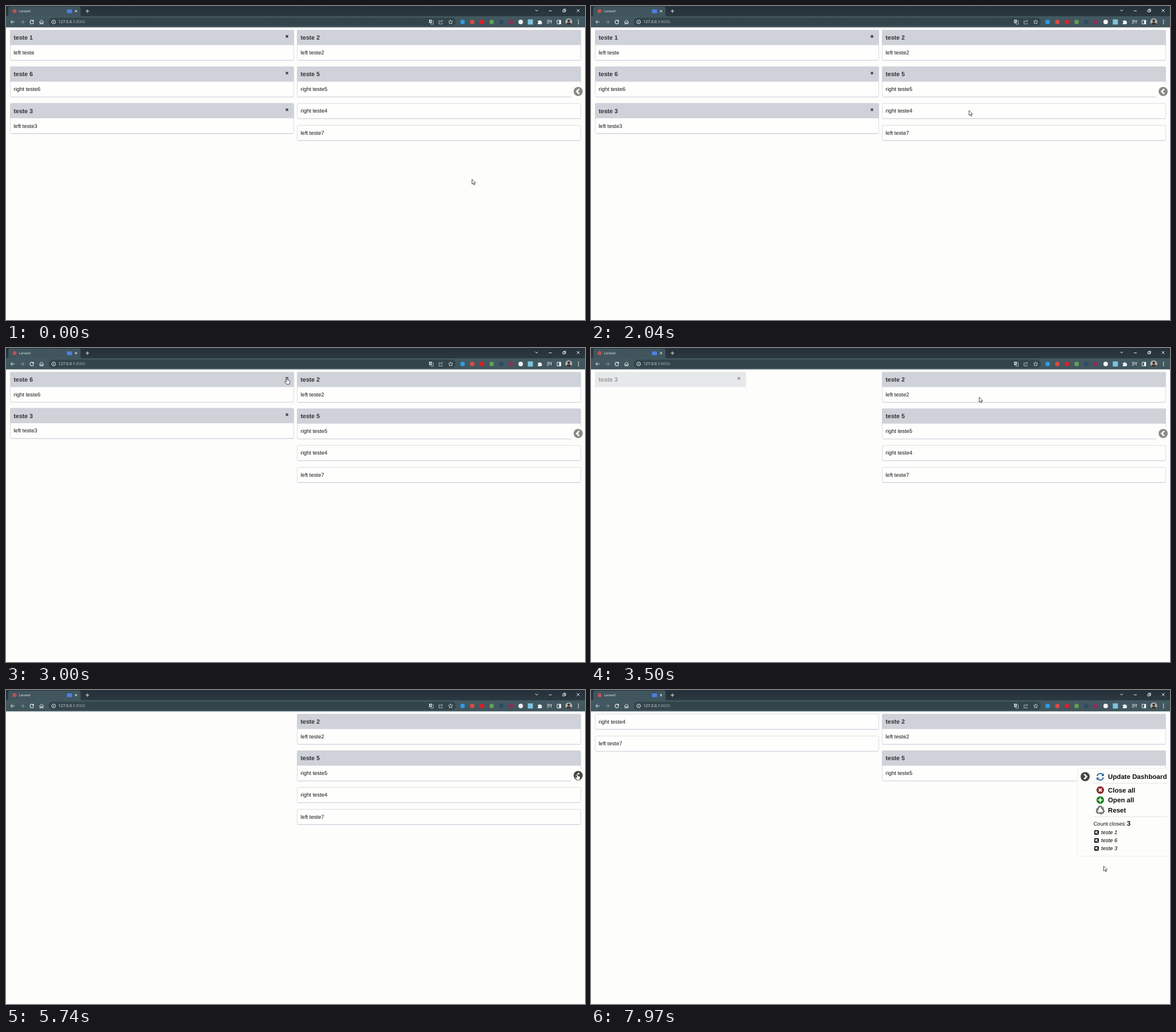
An HTML page for the animation above (8 s loop, 1017x551 px).

```html
<!DOCTYPE html>
<html lang="pt">
<head>
<meta charset="utf-8">
<title>Dashboard</title>
<style>
html, body { margin: 0; width: 100%; height: 100%; overflow: hidden; background: #fdfdfb; }
svg { display: block; }
#stage { position: absolute; left: 0; top: 0; }
text { font-family: "Liberation Sans", Arial, sans-serif; font-size: 9.53px; fill: #161616; white-space: pre; text-rendering: geometricPrecision; }
.title { font-size: 10.6px; font-weight: bold; fill: #303236; }
.menu { font-size: 11.65px; font-weight: bold; fill: #111; }
.item { font-style: italic; fill: #000; }
.ui { font-family: "Open Sans", "Noto Sans", sans-serif; font-size: 6px; fill: #eef3f4; }
.url { font-size: 6.93px; }
.line { fill: none; stroke: #e6edef; stroke-width: 1; }
</style>
</head>
<body>
<svg id="stage" width="1017" height="551" viewBox="0 0 1017 551">
  <defs>
    <linearGradient id="strip" x2="0" y2="1"><stop stop-color="#25313a"/><stop offset="1" stop-color="#2c3940"/></linearGradient>
    <linearGradient id="bar" x2="0" y2="1"><stop stop-color="#435961"/><stop offset="1" stop-color="#40545c"/></linearGradient>
  </defs>
  <rect width="1017" height="551" fill="#fdfdfb"/>
  <g id="page"></g>
  <g id="chrome">
    <rect width="1017" height="18.5" fill="url(#strip)"/>
    <path d="M2 18.5Q4 18 4 15V4Q4 1 7 1H128Q131 1 131 4V15Q131 18 134 18.5Z" fill="#40555e"/>
    <rect y="18" width="1017" height="19.5" fill="url(#bar)"/>
    <rect x="75" y="20.5" width="715" height="14.5" rx="7.2" fill="#33444b"/>
    <text class="ui" x="23" y="11.2">Laravel</text>
    <rect x="107" y="6" width="9" height="6.5" rx="1" fill="#4c7fe0"/>
    <path class="line" d="M121 7l4 4m0-4l-4 4M140 9h6m-3-3v6M929.5 6.5l2.5 2.5 2.5-2.5M953.5 8.5h5M1002.5 5.5l5 5m0-5l-5 5"/>
    <path class="line" d="M978 7h3.5v3.5h-3.500zM979.5 6.5v-1h3.5v4h-1" stroke-width=".8"/>
    <path class="line" d="M15 28H8.5m3-3.200L8.300 28l3.200 3.200"/>
    <path class="line" d="M25.5 28H32m-3-3.200l3.200 3.200-3.200 3.200" style="stroke:#8b9da4"/>
    <path class="line" d="M58.500 28.300l3.900-3.800 3.900 3.800M59.700 27.500v4h1.800v-2.500h1.800v2.500h1.800v-4"/>
    <circle class="line" cx="83.7" cy="28" r="3.300" stroke-width=".8"/>
    <path class="line" d="M83.700 27.500v2.400M83.700 25.900v.8"/>
    <text class="ui url" x="92" y="30.400">127.0.0.1<tspan fill="#a2b1b6">:8000</tspan></text>
    <path class="line" d="M762.5 26h-2v5.500h6v-2M762.5 29q.3-3 4-3m-1.500-1.700l1.700 1.700-1.700 1.700" style="stroke-width:.8;stroke:#c5d0d3"/>
    <path class="line" d="M781 24.300l1.100 2.400 2.600.3-1.900 1.800.5 2.600-2.300-1.300-2.300 1.300.5-2.600-1.900-1.800 2.600-.3z" style="stroke-width:.8"/>
    <g id="extensions"></g>
    <path d="M934 26h2a1.400 1.400 0 0 1 2.700 0h2v2a1.400 1.400 0 0 1 0 2.700v1.300h-6.700v-1.800a1.400 1.400 0 0 0 0-2.700z" fill="#eef3f4"/>
    <path class="line" d="M950.5 25.300h5.500M950.5 27.800h5.500M950.5 30.300h3M957.5 30.500v-5h1.500"/>
    <path class="line" d="M968 25h6.500v6.500h-6.500z"/><path d="M971.5 25h3v6.500h-3z" fill="#eef3f4"/>
    <circle cx="988.5" cy="27.8" r="6" fill="#b9b5b0"/>
    <path d="M984 31.800q.5-3 4.500-3t4.500 3q-4.500 4-9 0z" fill="#3c3735"/><circle cx="988.5" cy="26" r="2.400" fill="#3c3735"/>
    <g fill="#eef3f4"><circle cx="1005.5" cy="25" r=".9"/><circle cx="1005.5" cy="28" r=".9"/><circle cx="1005.5" cy="31" r=".9"/></g>
  </g>
  <g id="status"></g>
  <g id="pointer"></g>
</svg>
<script>
const LOOP = 8000;
const $ = id => document.getElementById(id);
const clamp = v => Math.max(0, Math.min(1, v));
const smooth = v => { v = clamp(v); return v * v * (3 - 2 * v); };
const mix = (a, b, k) => a + (b - a) * k;
const within = (t, ...spans) => spans.some(([a, b]) => t >= a && t < b);

const LEFT = 7.5, RIGHT = 511.5, TOP = 42.4, WIDTH = 498;
const FULL = 64.3, SHORT = 38.4, HIDE = 380;
const GRABS = [[5990, 6430], [6733, 7360]];

// time, x, y of the pointer's hot spot
const PATH = [
  [0, 818.5, 304], [600, 813, 283], [1330, 813, 283], [1660, 790, 224],
  [2480, 508.2, 133], [2540, 508.2, 133], [2615, 493.5, 52], [3320, 493.5, 52],
  [3500, 681.8, 86.3], [3740, 1003.5, 147], [4180, 1003.5, 147], [4550, 950, 302],
  [4950, 940, 282], [5330, 940, 282], [5650, 1003.5, 146.5], [5790, 1003.5, 146.5],
  [5970, 515, 172], [5990, 515, 172], [6390, 14, 46], [6450, 14, 46],
  [6690, 515, 172], [6733, 515, 172], [7230, 14, 50], [7330, 14, 84],
  [7380, 14, 84], [7470, 88, 84], [7690, 1003.5, 147], [7750, 1003.5, 147], [7970, 900.5, 309]
];

function pointerAt(t) {
  const i = PATH.findIndex(p => p[0] > t);
  if (i < 0) return PATH[PATH.length - 1].slice(1);
  const [t0, x0, y0] = PATH[i - 1], [t1, x1, y1] = PATH[i];
  const k = smooth((t - t0) / (t1 - t0));
  return [mix(x0, x1, k), mix(y0, y1, k)];
}

const label = (x, y, s, cls = "") => `<text x="${x}" y="${y}" class="${cls}">${s}</text>`;

function card(x, y, { title, body, closable, w = WIDTH, opacity = 1 }) {
  const h = title ? 52.9 : 26.7, bottom = y + h;
  let s = `<g opacity="${opacity}"><rect x="${x}" y="${y}" width="${w}" height="${h}" rx="2" fill="#fefefd" stroke="#dcdde3"/>` +
    `<path d="M${x + 1} ${bottom}h${w - 2}" stroke="#cdcfdc"/>`;
  if (title) {
    s += `<path d="M${x - .5} ${y + 26}v-24.5q0-2 2-2h${w - 3}q2 0 2 2v24.5z" fill="#cfd2d9"/>` + label(x + 6, y + 16.6, title, "title");
    if (closable) s += `<path d="M${x + w - 14} ${y + 9}l4 4m0-4l-4 4" stroke="#303236" stroke-width="1.6"/>`;
  }
  return s + label(x + 6, y + (title ? 42.5 : 16.4), body) + "</g>";
}

const placeholder = (x, y) =>
  `<rect x="${x}" y="${y}" width="489" height="29.3" rx="2" fill="#fefefd" stroke="#99988a"/>`;

const CLOSABLE = [
  { title: "teste 1", body: "left teste", close: 2620 },
  { title: "teste 6", body: "right teste6", close: 2970 },
  { title: "teste 3", body: "left teste3", close: 3310 }
];

function closableCards(t) {
  let y = TOP, s = "";
  for (const c of CLOSABLE) {
    const opacity = (1 + Math.cos(Math.PI * clamp((t - c.close) / HIDE))) / 2;
    if (opacity <= 0) continue;
    const w = Math.max(4, WIDTH * Math.min(1, opacity * 1.07)), k = Math.pow(opacity, .7);
    s += `<svg x="0" y="${y - 1}" width="1017" height="${55 * k}">${card(LEFT, 1, { ...c, closable: true, w, opacity })}</svg>`;
    y += FULL * k;
  }
  return s;
}

function movableCards(t, px, py) {
  let leftY = TOP, rightY = TOP + 2 * FULL, s = "", floating = "";
  ["right teste4", "left teste7"].forEach((body, i) => {
    const [grab, drop] = GRABS[i];
    const put = (onLeft, draw, step) => {
      s += draw(onLeft ? LEFT : RIGHT, onLeft ? leftY : rightY);
      if (onLeft) leftY += step; else rightY += step;
    };
    if (t >= grab && t < drop) {
      put(px < 260, placeholder, SHORT + 2.5);
      floating = card(px - 4.2, py + 2.5, { body, opacity: .7 });
    } else put(t >= drop, (x, y) => card(x, y, { body }), SHORT);
  });
  return [s, floating];
}

const disc = (y, color, d) =>
  `<circle cx="894.5" cy="${y}" r="6.6" fill="${color}"/><path d="${d}" stroke="#fff" stroke-width="2.200"/>`;

const recycle = [0, 120, 240].map(a =>
  `<g transform="rotate(${a} 894.5 211)"><path d="M890.3 208.300l2.400-3.800h3.600l1.200 2" fill="none" stroke="#6d706c" stroke-width="2.600"/>` +
  `<path d="M895.200 208l5.200-3-.2 5.200z" fill="#6d706c"/></g>`).join("");

const MENU =
  `<path d="M889 151a5.600 5.600 0 0 1 9.800-2.500M900 153.500a5.600 5.600 0 0 1-9.800 2.500" fill="none" stroke="#34699c" stroke-width="2"/>` +
  `<path d="M901 146v5h-5zM888 158.500v-5h5z" fill="#34699c"/>` +
  disc(175.5, "#8d2b2e", "M892 173l5 5m0-5l-5 5") + disc(193, "#17851c", "M890.7 193h7.600m-3.800-3.800v7.600") +
  recycle +
  `<path d="M882 163.5h130M882 222.5h130" stroke="#e3e3e0"/>` +
  label(908, 156, "Update Dashboard", "menu") + label(908, 179.5, "Close all", "menu") +
  label(908, 197, "Open all", "menu") + label(908, 214.7, "Reset", "menu") +
  label(882.5, 238, "Count closes:") + label(941.3, 238.3, "3", "menu") +
  CLOSABLE.map((c, i) => {
    const y = 246 + 14 * i;
    return `<rect x="884" y="${y}" width="8" height="8" rx="1.5" fill="#111"/>` +
      `<path d="M890.5 ${y + 6.5}l-4-4m0 3.300v-3.500h3.500" fill="none" stroke="#fff" stroke-width="1.2"/>` +
      label(896, y + 7.4, c.title, "item");
  }).join("");

function panel(t, hover) {
  const k = t < 5020 ? smooth((t - 3850) / 150) : smooth((t - 7740) / 130);
  const dx = 137.5 * (1 - k), bx = 868 + dx - .5 * (1 - k), by = mix(150, 152, k);
  const dir = k > .5 ? 1 : -1, color = hover || k > .5 ? "#454541" : "#8a8a85";
  const box = k > 0
    ? `<g transform="translate(${dx})"><rect x="854.5" y="137.5" width="170" height="154" fill="#fdfdfb" stroke="#efefeb"/>${MENU}</g>`
    : `<rect x="993" y="138" width="24" height="25" fill="#fdfdfb"/>`;
  return box + `<circle cx="${bx}" cy="${by}" r="8" fill="${color}"/>` +
    `<path d="M${bx - 1.8 * dir} ${by - 4.3}l${4.3 * dir} 4.3l${-4.3 * dir} 4.3" fill="none" stroke="#fff" stroke-width="2.6"/>`;
}

function page(t, px, py, hover) {
  if (within(t, [650, 1500], [5030, 5430])) return "";
  const [cards, floating] = movableCards(t, px, py);
  return closableCards(t) +
    card(RIGHT, TOP, { title: "teste 2", body: "left teste2" }) +
    card(RIGHT, TOP + FULL, { title: "teste 5", body: "right teste5" }) +
    cards + floating + panel(t, hover);
}

function status(t) {
  const loading = within(t, [560, 1720], [4900, 5560]);
  const ready = !within(t, [620, 1800], [4990, 5620]);
  const tab = loading
    ? `<path transform="rotate(${t * .36 % 360 + 260} 15 9)" d="M15 5.5a3.5 3.5 0 1 1-3.5 3.5" fill="none" stroke="#8fa9c4"/>`
    : `<circle cx="15" cy="9" r="3.5" fill="#b9544f"/>`;
  const button = loading
    ? `<path class="line" d="M42.5 25l6 6m0-6l-6 6" style="stroke-width:1.2"/>`
    : `<path class="line" d="M48 26.2a3.2 3.2 0 1 0 .6 2.6" style="stroke-width:1.2"/><path d="M49 24v3.5h-3.500z" fill="#eef3f4"/>`;
  const translate = ready
    ? `<rect x="743" y="24" width="5" height="6" fill="#c5d0d3"/><path class="line" d="M748.5 26h2v6h-4.500v-1.500" style="stroke-width:.8;stroke:#c5d0d3"/><path d="M744.3 28.5l1.2-3 1.2 3" stroke="#33444b" fill="none" stroke-width=".7"/>`
    : "";
  return tab + button + translate;
}

const outline = d => `<path d="${d}" fill="#fff" stroke="#222" stroke-width=".8"/>`;
const arm = [0, 90, 180, 270].map(a =>
  `<path transform="rotate(${a})" d="M-.8 0v-3.100h-1.400L0-5.300l2.200 2.200H.8V0z"/>`).join("");
const POINTERS = {
  arrow: outline("M0 0v8.600l2-1.800 1.400 3.200 1.500-.7-1.400-3h2.800z"),
  hand: outline("M-1 .8q1-1.300 2 0v3.400l3.300.8q1 .4.800 2l-.8 4.500h-5l-3.300-4.500q0-1.500 1.500-.7l1.500 1z"),
  move: `<g stroke="#222" stroke-width="1.3">${arm}</g><g fill="#fff">${arm}</g>`
};

function pointerKind(t) {
  if (within(t, [5975, 6440], [6695, 7380])) return "move";
  return within(t, [2600, 3335], [3720, 4200], [5630, 5805], [7670, 7765]) ? "hand" : "arrow";
}

const ICONS = [
  [802, "#2f9be0"], [819, "#d94a45"], [836, "#d8202c"], [853, "#5f9f56"], [870, "#2f4a66"],
  [887, "#8a2f5b"], [904, "#f2f2f2"], [921, "#7fc3df", "square"]
];
$("extensions").innerHTML = ICONS.map(([x, color, shape]) => shape
  ? `<rect x="${x - 4.5}" y="23.5" width="9" height="9" fill="${color}"/>`
  : `<circle cx="${x}" cy="28" r="4" fill="${color}"/>`).join("");

const shown = {};
function show(id, markup) {
  if (shown[id] !== markup) $(id).innerHTML = shown[id] = markup;
}

function render(t) {
  const [x, y] = pointerAt(t), kind = pointerKind(t);
  show("page", page(t, x, y, kind === "hand" && x > 990));
  show("status", status(t));
  show("pointer", `<g transform="translate(${x} ${y})">${POINTERS[kind]}</g>`);
}

const start = performance.now();
function tick() {
  render((performance.now() - start) % LOOP);
  requestAnimationFrame(tick);
}
tick();
</script>
</body>
</html>
```
